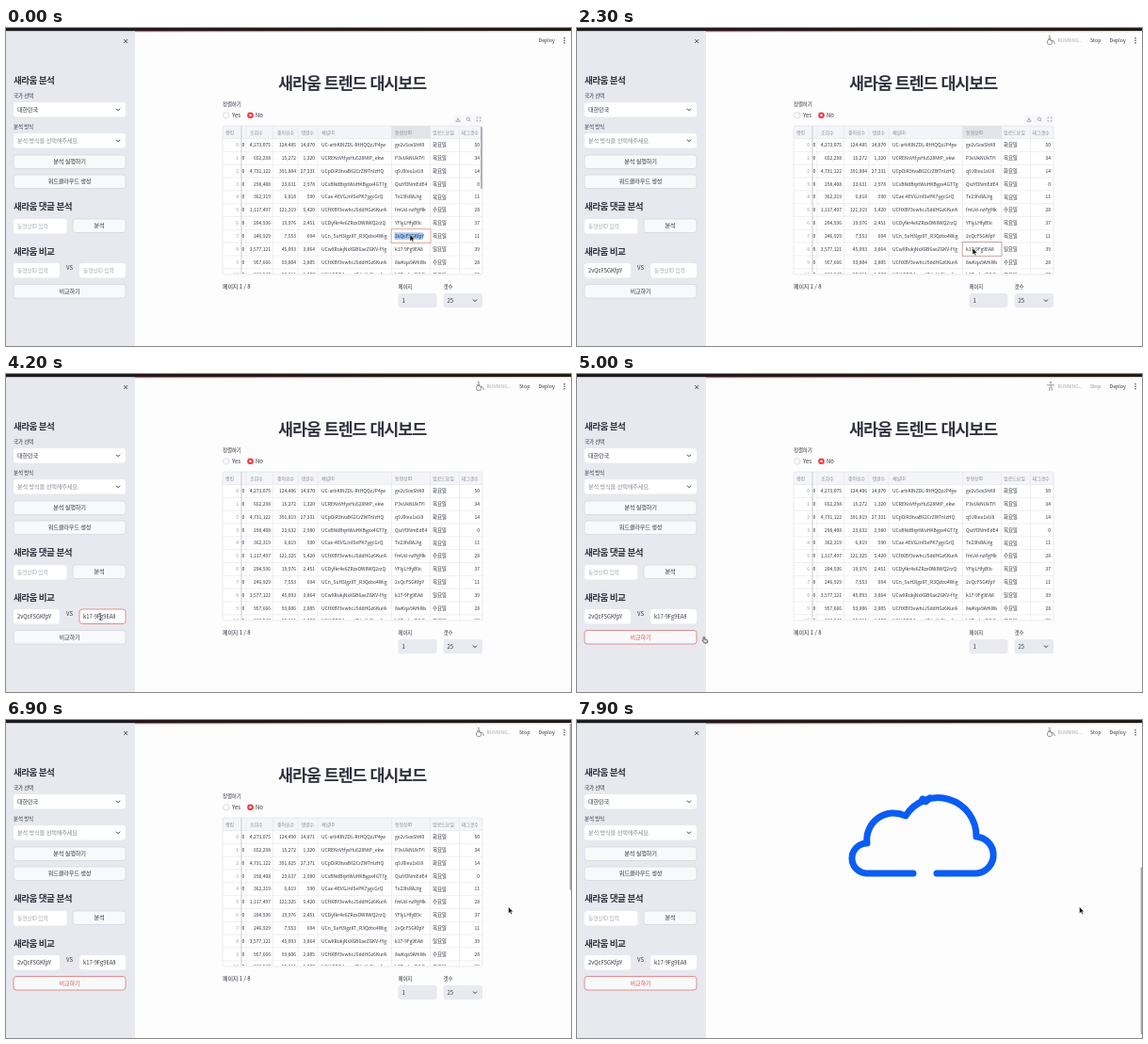
These frames come from a looping animation (600x338 px, 8000 ms). An HTML page:

```html
<!DOCTYPE html>
<html lang="ko">
<head>
<meta charset="utf-8">
<title>트렌드 대시보드</title>
<style>
html, body { margin: 0; width: 100%; height: 100%; overflow: hidden; background: #fdfdfe; }
svg { display: block; width: 100vw; height: 100vh; }
text { font-family: "Noto Sans CJK KR", "Noto Sans CJK", "Noto Sans", sans-serif; white-space: pre; }
.ko { letter-spacing: -.06em; }
.small { letter-spacing: -.03em; }
</style>
</head>
<body>
<svg id="stage" viewBox="0 0 600 338"></svg>
<script>
const INK = '#31333f', GRAY = '#9a9ca5', RED = '#e0605d', LINE = '#e4e5ea';
const LOOP = 8000;

// Text placed by its vertical centre.
function label(x, cy, str, size, { fill = INK, weight = 500, anchor = 'start', id = '' } = {}) {
  const spacing = /[가-힣]/.test(str) ? (size < 8 ? 'small' : 'ko') : '';
  return `<text class="${spacing}" ${id && `id="${id}"`} x="${x}" y="${(cy + size * .36).toFixed(2)}" font-size="${size}" ` +
    `font-weight="${weight}" fill="${fill}" text-anchor="${anchor}">${str}</text>`;
}
const box = (x, y, w, h, fill, extra = '') =>
  `<rect x="${x}" y="${y}" width="${w}" height="${h}" rx="3" fill="${fill}" ${extra}/>`;
const chevron = (x, y) =>
  `<path d="M${x - 2} ${y - 1}l2 2 2-2" fill="none" stroke="${INK}" stroke-width="1"/>`;
const button = (x, y, w, str, id) =>
  box(x, y, w, 14.5, '#f8f9fb', `stroke="#d3d5db" stroke-width=".7" ${id ? `id="${id}Box"` : ''}`) +
  label(x + w / 2, y + 7.2, str, 6.2, { anchor: 'middle', id: id ? id + 'Text' : '' });
const input = (x, y, w, id) =>
  box(x, y, w, 15.5, '#fff', `id="${id}Box" stroke-width=".7"`) +
  label(x + 4, y + 7.8, '동영상ID 입력', 5.8, { fill: '#a9abb3', id: id + 'Text' });
const heading = (cy, str) => label(8, cy, str, 9.6, { weight: 700 });

// views likes comments channel video weekday tags; "a/b/c" holds successive reloads
const rows = `4,273,075 124,485/124,486/124,490 14,870/14,870/14,871 UC-arbKINZDL-RtHQQzJP4jw ge2vSoxShK0 화 50
652,298 15,272 1,320 UCREKoVtfysHu528NtP_ekw P3vUkNUkTYI 목 34
4,731,122 391,804/391,819/391,825 27,331/27,331/27,371 UCpDiR3tvaB62CrZWTnIzHQ q9J0Ieu1xU8 화 14
298,408 23,631/23,632/23,637 2,978/2,980/2,980 UCsBNdBrptWuHKBypx4GT7g QszYDNmEdE4 목 0
362,319 6,818/6,819/6,819 590 UCae-4EVGJnfSePK7ygcGrQ Te23fsRAJtg 목 11
1,117,497 121,319/121,325/121,325 5,420 UCftXBY3vwhcJ5ddHGz6KurA fmUd-nzPgMk 수 28
204,936 19,976 2,451 UCDyfkr4e6ZRzxOW8WQ2rzQ YFlyLHfyB9c 목 37
246,929 7,553 694 UCn_5uH3lgz8T_R3Qzbo4Wig 2vQcFSGKfpY 목 11
3,577,121 45,093 3,864 UCwXRukjNxXGB6aeZGKV-fYg k17-9Fg9EA8 일 39
957,666 93,804/93,806/93,806 2,805 UCftXBY3vwhcJ5ddHGz6KurA 8wKqa9AHiWs 수 28
812,540 20,311 1,207 UCtkRBQ4ewnJ7deHz5LusApw h3TzqLw0VbE 목 22`
  .split('\n').map(line => line.split(' '));
const columns = [
  ['조회수', 281, 1, 259], ['좋아요수', 308, 1, 288], ['댓글수', 328, 1, 313.5], ['채널ID', 335, 0, 335],
  ['동영상ID', 413, 0, 413], ['업로드요일', 453, 0, 453], ['태그갯수', 503, 1, 483.5]
];
const CELL = 5, ROW = 13.83, rowY = i => 124.3 + ROW * i;

function tableCells(version) {
  return rows.map((row, i) => {
    const y = rowY(i);
    const cells = row.map((cell, c) => {
      const [, x, right] = columns[c];
      const options = cell.split('/');
      const str = options[version] || options[0];
      return c === 5 ? label(x, y, str + '요일', 5.5)
        : label(x, y, str, CELL, { anchor: right ? 'end' : 'start' });
    }).join('');
    return label(247, y, String(i), CELL, { fill: GRAY, anchor: 'end' }) + label(250.4, y, '0', CELL) + cells;
  }).join('');
}

function tableFrame() {
  let lines = '';
  for (let i = 0; i <= 10; i++) lines += `M230 ${117.5 + ROW * i}H506`;
  for (const x of [255, 283.5, 310, 331, 409.5, 450.5, 481.5]) lines += `M${x} 104V262`;
  return `<rect x="230" y="104" width="276" height="158" fill="#fff"/>
    <rect x="230" y="104" width="276" height="13.5" fill="#f4f5f8"/>
    <rect id="activeHeader" x="409.5" y="104" width="41" height="13.5" fill="#e3e4e9"/>
    <path d="${lines}" stroke="${LINE}" stroke-width=".6"/>
    <path d="M250 104V262" stroke="#c9cbd1" stroke-width="1"/>` +
    label(233, 111, '랭킹', 5.1, { fill: '#8a8c96' }) +
    columns.map(([name, , , x]) => label(x, 111, name, 5.1, { fill: '#8a8c96' })).join('');
}

const sidebar = `<rect y="3" width="137" height="335" fill="#e7e9ef"/>
  <path d="M125.2 12l4 4m0-4l-4 4" stroke="${INK}" stroke-width=".8"/>` +
  heading(55.5, '새라움 분석') + label(8, 72.3, '국가 선택', 5.5) +
  box(8, 79, 119, 15.5, '#fff') + label(12, 86.8, '대한민국', 6.2) + chevron(119, 86.7) +
  '<g id="sideRest">' + label(8, 105.3, '분석 방식', 5.5) +
  box(8, 112, 119, 15.5, '#fff') + label(12, 119.8, '분석 방식을 선택해주세요.', 6.2, { fill: '#8b8d96' }) +
  chevron(119, 119.7) + button(8, 135, 119, '분석 실행하기') + button(8, 156, 119, '워드클라우드 생성') +
  heading(190, '새라움 댓글 분석') + input(8, 203, 56.5, 'comment') + button(71, 203, 56, '분석') +
  heading(238, '새라움 비교') + input(8, 250, 49, 'first') + label(64, 255.2, 'VS', 6) +
  input(78, 250, 49, 'second') + button(8, 272.5, 119, '비교하기', 'compare') + '</g>';

const toolbar = `<g id="toolbar" fill="none" stroke="#7b7d87" stroke-width=".6">
  <rect x="474.5" y="92" width="32" height="10.5" rx="2" fill="#f8f8fa" stroke="none"/>
  <path d="M480 95v3m-1.3-1.2l1.3 1.3 1.3-1.3M478 98v1.3h4V98M492 98l1.4 1.4M500 96.3V95h1.3m1.4 0h1.3v1.3m0 1.4V99h-1.3m-1.4 0H500v-1.3"/>
  <circle cx="490.8" cy="96.7" r="1.7"/></g>`;

const dashboard = '<g id="page"><g id="title">' +
  label(289, 59, '새라움 트렌드 대시보드', 17.4, { weight: 700 }) + '</g><g id="data">' +
  label(230, 81.2, '정렬하기', 5.5) +
  `<circle cx="233.8" cy="92.8" r="3.2" fill="#fff" stroke="#c9cbd1" stroke-width=".7"/>
   <circle cx="259.5" cy="92.8" r="3.3" fill="#f5333b"/><circle cx="259.5" cy="92.8" r="1.3" fill="#fff"/>` +
  label(240, 92.9, 'Yes', 6) + label(265, 92.9, 'No', 6) +
  `<g clip-path="url(#tableClip)">${tableFrame()}<g id="cells"></g></g>
   <rect x="230" y="104" width="276" height="158" rx="2" fill="none" stroke="${LINE}" stroke-width=".8"/>
   <g id="editor"><rect id="editBox" x="409.2" width="41.8" height="14.8" fill="#fff" stroke-width=".9"/>
   <rect id="mark" x="412.5" height="7.4" fill="#9fc6f5"/><g id="editText"></g></g>
   <g id="tableScroll" fill="#a8a9ae"><rect x="504" y="105" width="1.8" height="66" rx=".9"/>
   <rect id="tableScrollX" x="431" y="258.8" width="73" height="1.8" rx=".9"/></g>` + toolbar + '</g>' +
  '<g id="pager">' + label(230, 275, '페이지 1 / 8', 6.1) +
  label(416.5, 275.2, '페이지', 5.5) + label(464.5, 275.2, '갯수', 5.5) + '</g><g id="pageInputs">' +
  box(416.5, 282, 41, 15.2, '#e8eaf0') + label(420.5, 289.7, '1', 6) +
  box(464.5, 282, 41.5, 15.2, '#e8eaf0') + label(468.5, 289.7, '25', 6) + chevron(498, 289.6) + '</g>' +
  `<g id="cloud" transform="translate(0 289)" fill="none" stroke="#0a5cf5" stroke-width="7" stroke-linecap="round" stroke-linejoin="round">
   <path d="M357 163H308A16 16 0 0 1 308 131A28.5 28.5 0 0 1 349 102A40.5 40.5 0 0 1 424 124A19.6 19.6 0 0 1 425 163H382"/>
   <path d="M367 84l3.5 2.7 4-3.7"/></g></g>`;

const icons = [
  '<circle cx="502" cy="15" r="2.7"/><path d="M502 9.5l1 4h3l1.4 3.5M500 11.5l3-.5"/><circle cx="501.7" cy="8.7" r=".6"/>',
  '<circle cx="503" cy="9.2" r=".8"/><path d="M499 11.8h8M503 11v4m-1.2 3v-4m2.4 4v-4"/>',
  '<path d="M499 16.5q1.3-1.2 2.6 0t2.6 0 2.6 0M500 13.5l3-2 2.5 2M499 10h5"/><circle cx="506" cy="11" r=".7"/>'
];
const chrome = `<rect x="137" y="3" width="463" height="19" fill="#fdfdfe"/>
  <g id="running"><g id="sport" fill="none" stroke="#8f9099" stroke-width=".9"></g>` +
  label(510.5, 13.3, 'RUNNING...', 4.9, { fill: '#a6a8b0' }) +
  label(545, 13.3, 'Stop', 5.3, { id: 'stop' }) + '</g>' + label(565.5, 13.3, 'Deploy', 5.3) +
  [10.8, 13.3, 15.8].map(y => `<circle cx="593" cy="${y}" r=".75" fill="${INK}"/>`).join('') +
  `<rect id="scrollbar" x="598.6" width="1.4" rx=".7" fill="#a9aaae"/>
  <rect width="600" height="3.2" fill="#1d1b20"/><rect x="137" y="3" width="463" height="1.2" fill="url(#stripe)"/>`;

const pointers = `<g id="pointer">
  <path id="arrow" d="M0 0V7.2L1.7 5.7 2.8 8 4 7.4 2.9 5.2H5.1Z" fill="#111" stroke="#fff" stroke-width=".5"/>
  <path id="hand" transform="scale(.85)" d="M1 0Q2 0 2 1V3L5 3.8Q5.8 4 5.6 5L5 7.6H1.5L-.9 4.6Q-.8 3.7 .1 4.3V1Q.1 0 1 0Z" fill="#d8d8dc" stroke="#222" stroke-width=".8"/>
  <path id="beam" d="M-1.3-3.5Q0-3.5 0-2.5V2.5Q0 3.5-1.3 3.5M1.3-3.5Q0-3.5 0-2.5M0 2.5Q0 3.5 1.3 3.5" fill="none" stroke="#222" stroke-width=".7"/></g>`;

document.getElementById('stage').innerHTML = `<defs>
  <clipPath id="tableClip"><rect x="230" y="104" width="276" height="157"/></clipPath>
  <linearGradient id="stripe"><stop stop-color="#ff5a50"/><stop offset="1" stop-color="#f6e98a"/></linearGradient></defs>
  <rect width="600" height="338" fill="#fdfdfe"/>` + dashboard + sidebar + chrome + pointers;

const el = id => document.getElementById(id);
const set = (id, attrs) => { for (const k in attrs) el(id).setAttribute(k, attrs[k]); };
const show = (id, on) => set(id, { display: on ? 'inline' : 'none' });
const within = (t, a, b) => t >= a && t < b;
const linear = u => u, smooth = u => u * u * (3 - 2 * u);

// Interpolates one component of [time, ...values] keyframes.
function track(keys, t, i = 1, ease = linear) {
  const n = keys.findIndex(k => k[0] > t);
  if (n === 0) return keys[0][i];
  if (n < 0) return keys[keys.length - 1][i];
  const a = keys[n - 1], b = keys[n];
  return a[i] + (b[i] - a[i]) * ease((t - a[0]) / (b[0] - a[0]));
}

const pointerPath = [[0, 429, 219.5], [300, 429, 219.5], [850, 30, 258], [1300, 30, 258], [1950, 416, 234],
  [2300, 420, 233.8], [2650, 413, 236], [3200, 441.5, 235], [3600, 441.5, 235], [4000, 100, 258],
  [4400, 100, 258], [4650, 108, 279], [4850, 112, 279], [5000, 134, 279.5], [5600, 440, 215],
  [6100, 532.5, 203], [6600, 533.5, 198.5]];
const scrollPath = [[7200, 0], [7400, 47], [7650, 200], [7900, 289], [8000, 293]];
const fade = [[5500, 0], [6100, 1], [6550, 1], [6700, 0]];
let shownVersion, shownEdit, shownSport;

function field(id, value, focused) {
  set(id + 'Box', { stroke: focused ? RED : 'none' });
  el(id + 'Text').textContent = value || '동영상ID 입력';
  set(id + 'Text', { fill: value ? INK : '#a9abb3', class: value ? '' : 'small' });
}

function draw(t) {
  const version = t < 2700 ? 0 : t < 6650 ? 1 : 2;
  if (version !== shownVersion) el('cells').innerHTML = tableCells(shownVersion = version);

  // Selected cell and its text highlight
  const editRow = t < 2000 ? 7 : 8;
  const editing = t < 850 || within(t, 2650, 4000);
  const markWidth = t < 850 ? 30.5 : track([[2650, 0], [3200, 29.5]], t, 1, smooth);
  show('editor', t < 4000);
  show('activeHeader', t < 4000);
  set('editBox', { y: rowY(editRow) - 7.4, stroke: editing ? '#dfa08c' : '#bb9c9a' });
  set('mark', { y: rowY(editRow) - 3.7, width: editing ? markWidth : 0 });
  if (editRow !== shownEdit) {
    shownEdit = editRow;
    el('editText').innerHTML = label(413, rowY(editRow), rows[editRow][4], CELL);
  }
  show('toolbar', t < 450 || within(t, 1750, 3700));
  show('tableScroll', t < 450 || within(t, 2800, 3700));
  show('tableScrollX', t > 450);

  field('first', t >= 1100 ? '2vQcFSGKfpY' : '', within(t, 850, 2000));
  field('second', t >= 4200 ? 'k17-9Fg9EA8' : '', within(t, 4050, 4800));
  const active = t >= 4600;
  set('compareBox', { stroke: active ? RED : '#d3d5db' });
  set('compareText', { fill: active ? '#d05654' : INK });

  const stale = track(fade, t);
  const dim = (id, least) => set(id, { opacity: 1 - stale * (1 - least) });
  dim('title', .5);
  dim('data', .35);
  dim('pager', .65);
  dim('pageInputs', .4);
  dim('sideRest', .45);

  show('running', t >= 1600);
  set('stop', { fill: within(t, 4800, 5300) ? '#8b8d96' : INK });
  const sport = within(t, 4800, 5400) ? 1 : within(t, 7200, 7600) ? 2 : 0;
  if (sport !== shownSport) el('sport').innerHTML = icons[shownSport = sport];

  const scroll = track(scrollPath, t);
  set('page', { transform: `translate(0 ${-scroll})` });
  show('cloud', t >= 6700);
  const tall = t >= 6800;
  show('scrollbar', t >= 5700);
  set('scrollbar', { y: tall ? 3 + scroll * .53 : 22, height: tall ? 178 : 305 });

  const x = track(pointerPath, t, 1, smooth), y = track(pointerPath, t, 2, smooth);
  const beam = within(t, 820, 1350) || within(t, 3980, 4450);
  const hand = within(t, 4600, 5050);
  set('pointer', { transform: `translate(${x} ${y})` });
  show('beam', beam);
  show('hand', hand);
  show('arrow', !beam && !hand);
}

const start = performance.now();
function tick() {
  draw((performance.now() - start) % LOOP);
  requestAnimationFrame(tick);
}
tick();
</script>
</body>
</html>
```
